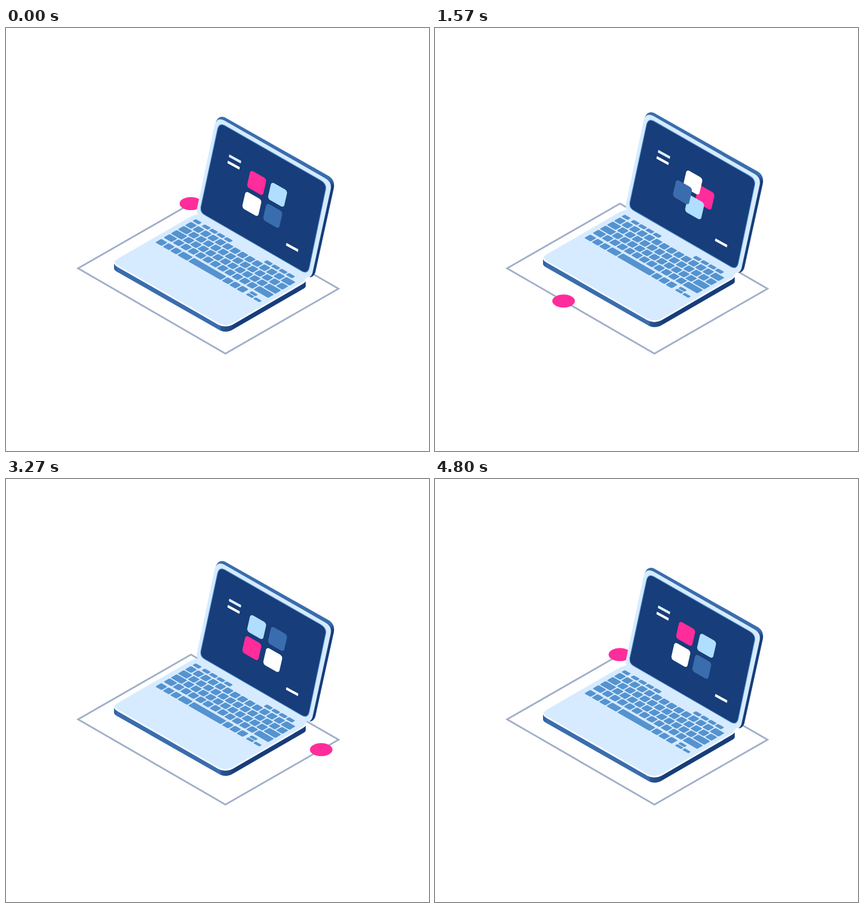
These frames come from a looping animation (748x748 px, 4830 ms). An HTML page:

```html
<!DOCTYPE html>
<html>
<head>
<meta charset="utf-8">
<title>Laptop</title>
<style>
  html, body { margin: 0; height: 100%; overflow: hidden; background: #fff; }
  svg { display: block; width: 748px; height: 748px; }
</style>
</head>
<body>
<svg viewBox="0 0 748 748">
  <defs>
    <linearGradient id="side" gradientUnits="userSpaceOnUse" x1="191" x2="531" y1="0" y2="0">
      <stop offset="0" stop-color="#2d5d9e"/>
      <stop offset=".02" stop-color="#3a6dad"/>
      <stop offset=".55" stop-color="#3a6dad"/>
      <stop offset=".56" stop-color="#28548f"/>
      <stop offset=".61" stop-color="#1f4884"/>
      <stop offset=".62" stop-color="#173d7a"/>
    </linearGradient>
    <linearGradient id="back" gradientUnits="userSpaceOnUse" x1="0" x2="0" y1="268" y2="280">
      <stop offset="0" stop-color="#3a6dad"/>
      <stop offset="1" stop-color="#173d7a"/>
    </linearGradient>
  </defs>
  <path id="track" d="M327 310.5L127.500 425L388 575.7L588 461Z" fill="none" stroke="#a0aeca" stroke-width="3"/>
  <ellipse id="dot" rx="20" ry="11.5" fill="#ff2d9b"/>
  <g id="laptop">
    <path fill="url(#side)" d="M191 415V425Q191 428 196 431L379 535Q388 539 398 535L526 461Q530 459 530 456V446L388 518Z"/>
    <path fill="#d6ebff" d="M196 409L323 335.500Q332 330 345 328L530 434Q535 446 525 451L400 523.500Q388 529.500 376 523.500L196 420.500Q187 416 196 409Z"/>
    <path fill="none" stroke="#fff" stroke-width="2.600" d="M192 415Q193 419 198 421.500L376 523.500Q388 529.500 400 523.500L525 451Q530 448 530 444"/>
    <g id="keys" fill="#5593d0" transform="matrix(1 .577 -1 .577 336 337.500)"/>
    <path fill="url(#back)" d="M371 166Q376 154 387 158L572 262.500Q582.500 270 579.500 284L547 432Q545 439 538 441L520 420Z"/>
    <path fill="#d6ebff" d="M369 171Q373 157 386 163.500L565 266Q577 273 574 286L542 433Q539 444 528 439L343 333Q335 328 338 318Z"/>
    <path fill="#173d7a" stroke="#5593d0" stroke-width="1.200" d="M374 179Q377 167 387 172.500L556 269Q568 276 565 287L536 425Q533 435 524 430.500L352 331Q342 326 345 314Z"/>
    <path fill="#dceeff" d="M395 223.500L416 235L415 239.500L394 228Z"/>
    <path fill="#fff" d="M392.500 234.500L413.500 246L412.500 250.500L391.500 239ZM496 380L517 391.500L516 396L495 384.500Z"/>
    <g id="tiles" transform="matrix(37 21 -8.500 37.200 457.500 303)"/>
  </g>
</svg>
<script>
const $ = id => document.getElementById(id);

function addRect(parent, x, y, width, height, rx, fill) {
  const rect = document.createElementNS('http://www.w3.org/2000/svg', 'rect');
  const attrs = { x, y, width, height, rx };
  if (fill) attrs.fill = fill;
  for (const name in attrs) rect.setAttribute(name, attrs[name]);
  return parent.appendChild(rect);
}

// Keyboard: each main row starts with one key, repeats a unit key and ends at the right edge
const GAP = 2, UNIT = 13, ROW_END = 185, KEY_HEIGHT = 10.6, HALF_KEY = 4.7;
const addKey = (x, y, width, height = KEY_HEIGHT) => addRect($('keys'), x, y, width, height, 1.5);

function addKeys(x, y, count, height) {
  for (let i = 0; i < count; i++) addKey(x + i * UNIT, y, UNIT - GAP, height);
}

addKeys(0, 0.5, 1, 6);
addKeys(16, 0.5, 4, 6);
addKeys(126, 0.5, 4, 6);

[[11, 12], [15.5, 12], [19, 11], [14, 11]].forEach(([first, count], row) => {
  const y = 9 + row * 12.6, last = first + GAP + count * UNIT;
  addKey(0, y, first);
  addKeys(first + GAP, y, count);
  addKey(last, y, ROW_END - last);
});

addKeys(0, 61.4, 3);
addKey(39, 61.4, 17);
addKey(58, 61.4, 57.5);
addKeys(117.5, 61.4, 3);
addKeys(160, 61.4, 1, HALF_KEY);
addKeys(160, 67.3, 2, HALF_KEY);

// Tiles in paint order; slot is the starting corner, clockwise from top left
const CORNERS = [[-.5, -.5], [.5, -.5], [.5, .5], [-.5, .5]];
const tiles = [['#ff2d9b', 0], ['#b0deff', 1], ['#fff', 3], ['#3a6dad', 2]].map(([fill, slot]) =>
  ({ slot, rect: addRect($('tiles'), -.385, -.405, .77, .81, .13, fill) }));

const LOOP = 4830, STEPS = 120;
const STEP_STARTS = [30, 70, 130, 170];
const trackLength = $('track').getTotalLength();

function ease(start, now) {
  const x = Math.min(1, Math.max(0, (now - start) / 16));
  return x * x * (3 - 2 * x);
}

function draw(ms) {
  // Five uneven steps in every 200 ms
  const t = ms % LOOP;
  const step = Math.floor(t / 200) * 5 + STEP_STARTS.filter(s => t % 200 >= s).length;

  const point = $('track').getPointAtLength(trackLength * Math.min(1, step / STEPS));
  $('dot').setAttribute('transform', `translate(${point.x} ${point.y})`);

  const rise = ease(1.3, step % 60), fall = ease(32.7, step % 60);
  $('laptop').setAttribute('transform', `translate(0 ${-12 * (rise - fall)})`);

  const turn = 2 * Math.floor(step / 60) + rise + fall;
  for (const { slot, rect } of tiles) {
    const at = slot + turn, i = Math.floor(at), p = at - i;
    const from = CORNERS[i % 4], to = CORNERS[(i + 1) % 4];
    const [x, y] = from.map((v, axis) => v + (to[axis] - v) * p);
    rect.setAttribute('transform', `translate(${x} ${y})`);
  }
}

const startTime = performance.now();
function tick() {
  draw(performance.now() - startTime);
  requestAnimationFrame(tick);
}
tick();
</script>
</body>
</html>
```
